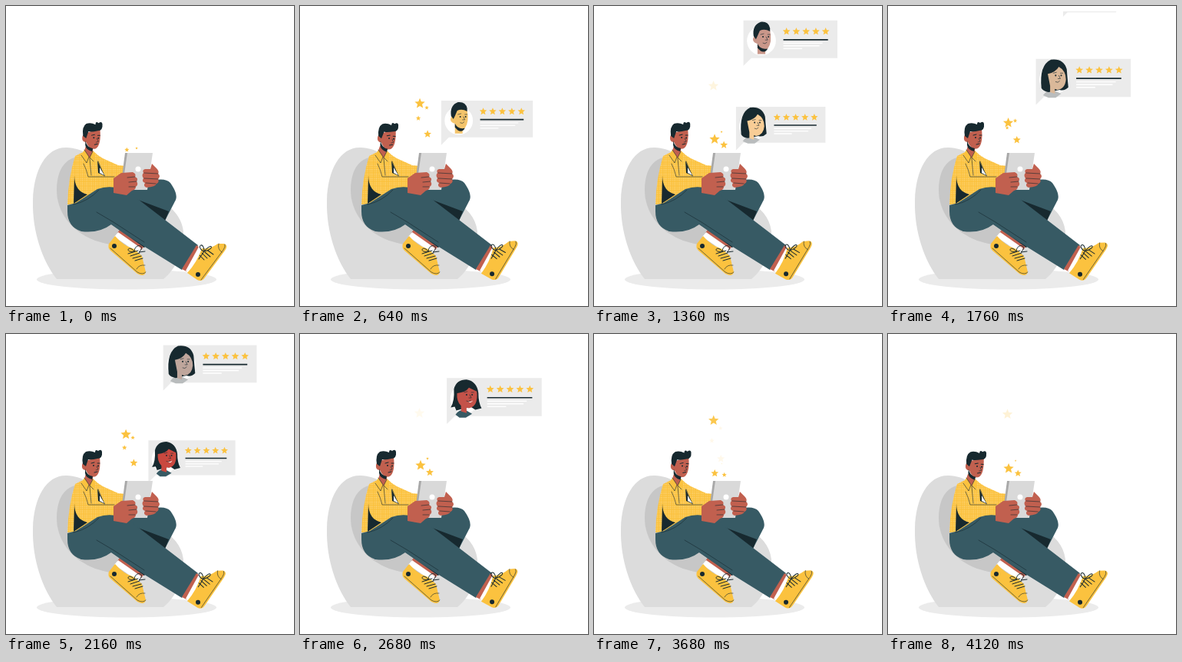
Recreate the animation shown at these times as an HTML page. Size 375 by 390 pixels, loop 4.16 s.

```html
<!DOCTYPE html>
<html lang="en">
<head>
<meta charset="utf-8">
<title>Reading reviews</title>
<style>
  html, body { margin: 0; width: 100%; height: 100%; overflow: hidden; background: #fff; }
  svg { display: block; width: 100%; height: 100%; }
  .dark { fill: #17292f; }
  .pants { fill: #375a64; }
  .skin { fill: #c1604f; }
  .yellow { fill: #fbc23f; }
  .white { fill: #fff; }
  .line { fill: none; stroke: #17292f; stroke-width: 1; stroke-linecap: round; stroke-linejoin: round; }
  .thin { stroke-width: .6; }
</style>
</head>
<body>
<svg viewBox="0 0 375 390" xmlns="http://www.w3.org/2000/svg">
  <defs>
    <pattern id="weave" width="2.4" height="2.4" patternUnits="userSpaceOnUse">
      <rect width="2.4" height="2.4" fill="#fbc03a"/>
      <circle cx="1.2" cy="1.2" r=".6" fill="#ffe3a0"/>
    </pattern>
    <clipPath id="stage"><rect y="7" width="375" height="383"/></clipPath>
  </defs>

  <ellipse cx="157" cy="355.500" rx="117" ry="13" fill="#ebebeb"/>
  <path fill="#dcdcdc" d="M66 355C48 332 34 294 35 253C36 212 53 183 79 184C100 185 112 194 122 212L205 256C224 267 233 284 231 304C229 328 217 345 205 355Z"/>
  <path fill="#c7c7c7" d="M99 196C80 195 66 210 66 239C66 268 85 293 116 305C145 315 175 313 199 302L205 260L120 205Z"/>

  <g id="cards" clip-path="url(#stage)"></g>

  <!-- far leg and its shoe -->
  <path class="pants" d="M146 242L180 230Q206 221 214 230Q224 244 221 252L207 279L170 262Z"/>
  <path class="dark" d="M172 252L212 267L207 279L184 268Z"/>
  <path class="skin" d="M150 288L181 311L176 317L145 295Z"/>
  <path class="white" d="M146 294L176 315L172 321L141 300Z"/>
  <path class="yellow" d="M142 299Q153 312 167 316L177 325L182 346Q180 353 171 348L136 318Q132 314 134 309Z"/>
  <path class="line thin" d="M136 315L171 346Q178 350 182 346M170 342Q173 336 181 337"/>
  <circle class="dark" cx="141" cy="312" r="3"/>
  <path class="line" d="M159 322L172 318M162 325L174 321M165 328L176 325M168 331L178 328M167 319C154 322 159 309 167 319C168 307 183 311 173 320L181 319"/>
  <path class="pants" d="M112 266L142 277L185 308L180 314L147 291Z"/>
  <path class="dark" d="M116 266L142 279L183 309L180 314Z"/>

  <!-- torso -->
  <path fill="url(#weave)" d="M104 188L113 188Q119 194 126 198L146 207L157 208L153 222L141 223L141 243L92 257L80 258Q81 223 90 195Z"/>
  <path class="skin" d="M104 182L113 185L113 190L109 198L101 191Z"/>
  <path class="yellow" d="M102 187L108 196L105 204L98 194ZM113 189L109 197L114 202L116 195Z"/>
  <path class="line thin" d="M102 187L108 196L105 204L98 194M113 189L109 197L114 202M109 198L111 220M101 205Q105 213 107 222L141 222M120 202L128 221"/>
  <path class="dark" d="M89 220Q89 241 106 245L88 257ZM119 201Q124 213 129 221L120 217Z"/>
  <path class="white" d="M122 210L128 220L122 217Z"/>

  <!-- near leg -->
  <path class="pants" d="M80 259L91 256L119 238Q139 231 160 242L250 311L229 343L179 312L137 284Q121 296 98 293Q80 287 80 267Z"/>
  <path class="line thin" d="M118 268L140 281L180 307M88 258Q107 254 121 239"/>

  <!-- tablet and hands -->
  <path fill="#a8a8a8" d="M155 191L159 191L153 239L149 237Z"/>
  <path fill="#d9d9d9" d="M158 191L191 191L184 239L151 239Z"/>
  <circle class="white" cx="172" cy="212" r="3.500"/>
  <path class="skin" d="M140 224L150 217L165 216Q170 218 168 222Q173 224 170 228Q173 232 169 235Q169 239 164 240L157 246L140 243Z"/>
  <path class="line thin" d="M158 223L168 222M160 229L170 228M160 235L168 235"/>
  <path class="skin" d="M190 205L196 211Q200 215 198 218Q202 221 198 225Q200 229 196 231Q195 235 183 236Q178 234 181 230Q176 228 179 224Q176 220 179 217Q177 213 181 212L188 212Z"/>
  <path class="line thin" d="M180 217L198 218M180 224L198 225M182 230L195 231"/>

  <g id="head">
    <path class="skin" d="M103 165L122 160Q124 180 117 185Q109 188 104 177Q98 177 99 170Q100 166 103 168Z"/>
    <path class="dark" d="M103 175Q105 184 113 185L112 189Q104 187 103 181ZM100 169Q98 157 104 153Q110 151 116 154Q116 149 120 152Q124 149 125 153Q126 162 119 162Q111 164 107 163L104 172Z"/>
    <path class="line" d="M111 168L115 167M119 168L122 168M115 180L119 179"/>
    <path class="line thin" d="M118 172L120 176L117 177"/>
    <circle class="dark" cx="114" cy="171" r="1"/><circle class="dark" cx="120" cy="171.500" r="1"/>
  </g>

  <!-- near shoe -->
  <path class="skin" d="M248 311L252 314L235 345L229 342Z"/>
  <path class="white" d="M251 313L256 316L240 347L234 344Z"/>
  <g id="shoe">
    <path class="yellow" d="M255 315Q264 317 276 309L284 309Q290 311 285 318L259 353Q255 359 249 356L236 347Q249 333 255 315Z"/>
    <path class="line thin" d="M254 356L283 317Q286 313 285 310M277 309Q275 316 281 320"/>
    <circle class="dark" cx="250" cy="349" r="3"/>
    <path class="line" d="M252 324L258 330M255 321L262 328M259 320L266 326M263 318L270 323M257 319C246 312 258 305 258 319C268 306 273 316 258 319L251 329"/>
  </g>

  <g id="stars"></g>
</svg>
<script>
const LOOP = 4160;
const $ = id => document.getElementById(id);
const clamp = x => Math.max(0, Math.min(1, x));
const mix = (a, b, p) => a + (b - a) * p;

function starPath(x, y, r) {
  const points = Array.from({ length: 10 }, (_, i) => {
    const a = (i / 5 - .5) * Math.PI, q = i % 2 ? r * .45 : r;
    return (x + q * Math.cos(a)).toFixed(2) + ' ' + (y + q * Math.sin(a)).toFixed(2);
  });
  return 'M' + points.join('L') + 'Z';
}

// Each review rises from the tablet; delay in ms, drift to the right in px per ms.
const cards = [
  { delay: 0, drift: .017, skin: ['#f3c46c', '#c9978a'], portrait: `
    <path class="face" d="M14 14Q22 5 34 13Q37 28 31 36L28 38V43H18V30Q9 27 14 20Z"/>
    <path class="dark" d="M13 20Q11 6 22 2Q32 1 34 10L34 14Q27 10 21 13L18 20L16 24ZM18 30Q22 38 31 36Q28 42 22 39L18 35Z"/>` },
  { delay: 767, drift: .028, skin: ['#f8cd96', '#bfa69c'], portrait: `
    <path fill="#b9bcbd" d="M9 46Q14 39 21 39L32 44L25 49H16Z"/>
    <path class="dark" d="M7 37Q4 8 19 1Q35-1 39 13L41 36Q36 41 30 39L16 42Q9 41 7 37Z"/>
    <path class="face" d="M15 19Q25 17 29 10Q38 15 38 26Q37 38 27 39L24 38V44L18 42V34Z"/>` },
  { delay: 1607, drift: .021, skin: ['#c9483f', '#c1584f'], portrait: `
    <path class="pants" d="M11 46Q16 39 23 40L32 45L24 50H16Z"/>
    <path class="dark" d="M5 37Q10 29 9 14Q12 2 25 2Q38 4 40 19Q40 31 44 38L36 40L30 36L12 41L10 36Z"/>
    <path class="face" d="M13 19Q24 18 28 12L38 17Q40 36 28 38L25 37V44L18 42V35Q12 29 13 19Z"/>
    <path class="white" d="M26 29Q30 31 33 28Q31 33 26 29Z"/>` }
];

const features = `
  <path class="line thin" d="M22 18l4-1M31 18l3 0M29 21l2 4-3 0M25 29q3 2 5-1"/>
  <circle class="dark" cx="25" cy="21" r="1"/><circle class="dark" cx="32" cy="21" r="1"/>`;
const rating = Array.from({ length: 5 }, (_, i) => starPath(55 + 12.5 * i, 14.2, 5)).join('');

$('cards').innerHTML = cards.map(card => `<g>
  <path fill="#ebebeb" d="M0 0H120V48H10L0 58Z"/>
  <circle class="white" cx="23" cy="26" r="18.500"/>
  ${card.portrait}${features}
  <path class="yellow" d="${rating}"/>
  <path stroke="#17292f" stroke-width="1.6" d="M51 24.700H108"/>
  <path stroke="#fff" stroke-width="1.4" d="M51 29H101M51 32.500H97M51 36H75"/>
</g>`).join('');

function drawCards(t) {
  cards.forEach(({ delay, drift, skin }, i) => {
    const node = $('cards').children[i], age = t - delay, rise = age - 553;
    // Grows quickly, holds its size, then shrinks away at the top.
    const scale = 1.03 * (1 - Math.abs((age - 1050) / 850) ** 4.6);
    node.style.display = scale > 0 ? '' : 'none';
    if (scale <= 0) return;
    const x = 242 + drift * rise - 60 * scale;
    const y = 161 - .162 * rise + .00002 * rise * rise - 24 * scale;
    node.setAttribute('transform', `translate(${x} ${y}) scale(${scale})`);
    node.querySelector('.face').style.fill =
      `color-mix(in srgb, ${skin[1]} ${clamp((age - 650) / 650) * 100}%, ${skin[0]})`;
  });
}

const bursts = [
  { start: 0, length: 1900, power: 3 },
  { start: 1100, length: 1600, power: 1 },
  { start: 2524, length: 2300, power: 3 },
  { start: 3260, length: 6000, power: 1 }
];
// Positions in a tight cluster (a) and fully spread (b); each appears at spread `from`.
const sparks = [
  { a: [157, 171], b: [156, 125], r: 7, from: -.55 },
  { a: [166, 162], b: [165, 131], r: 2.8, from: -.3 },
  { a: [169, 180], b: [166, 166], r: 5.2, from: -.5 },
  { a: [156, 168], b: [154, 145], r: 3.4, from: .1 }
];
$('stars').innerHTML = bursts.map(() => `<g>${'<path class="yellow"/>'.repeat(sparks.length)}</g>`).join('');

function drawStars(t) {
  bursts.forEach(({ start, length, power }, i) => {
    const group = $('stars').children[i], p = (t - start) / length;
    group.style.display = p > 0 && p < 1 ? '' : 'none';
    if (p <= 0 || p >= 1) return;
    const spread = mix(-.35, 1.5, 1 - (1 - p) ** power);
    sparks.forEach(({ a, b, r, from }, k) => {
      const node = group.children[k];
      const size = r * clamp((spread - from) / .45);
      node.setAttribute('d', starPath(mix(a[0], b[0], spread), mix(a[1], b[1], spread), size));
      node.style.opacity = clamp(((k ? 1.3 : 1.5) - spread) / .25);
    });
  });
}

function draw(t) {
  drawCards(t);
  drawStars(t);
  const nod = Math.max(0, Math.cos(2 * Math.PI * (t - 640) / 3480)) ** 2;
  const tap = Math.abs(Math.sin(Math.PI * t / 1960));
  $('head').setAttribute('transform', `translate(${nod} ${nod / 2}) rotate(${nod * 3.5} 107 188)`);
  $('shoe').setAttribute('transform', `rotate(${-6.5 * tap} 243 348)`);
}

const start = performance.now();
function tick() {
  draw((performance.now() - start) % LOOP);
  requestAnimationFrame(tick);
}
tick();
</script>
</body>
</html>
```
